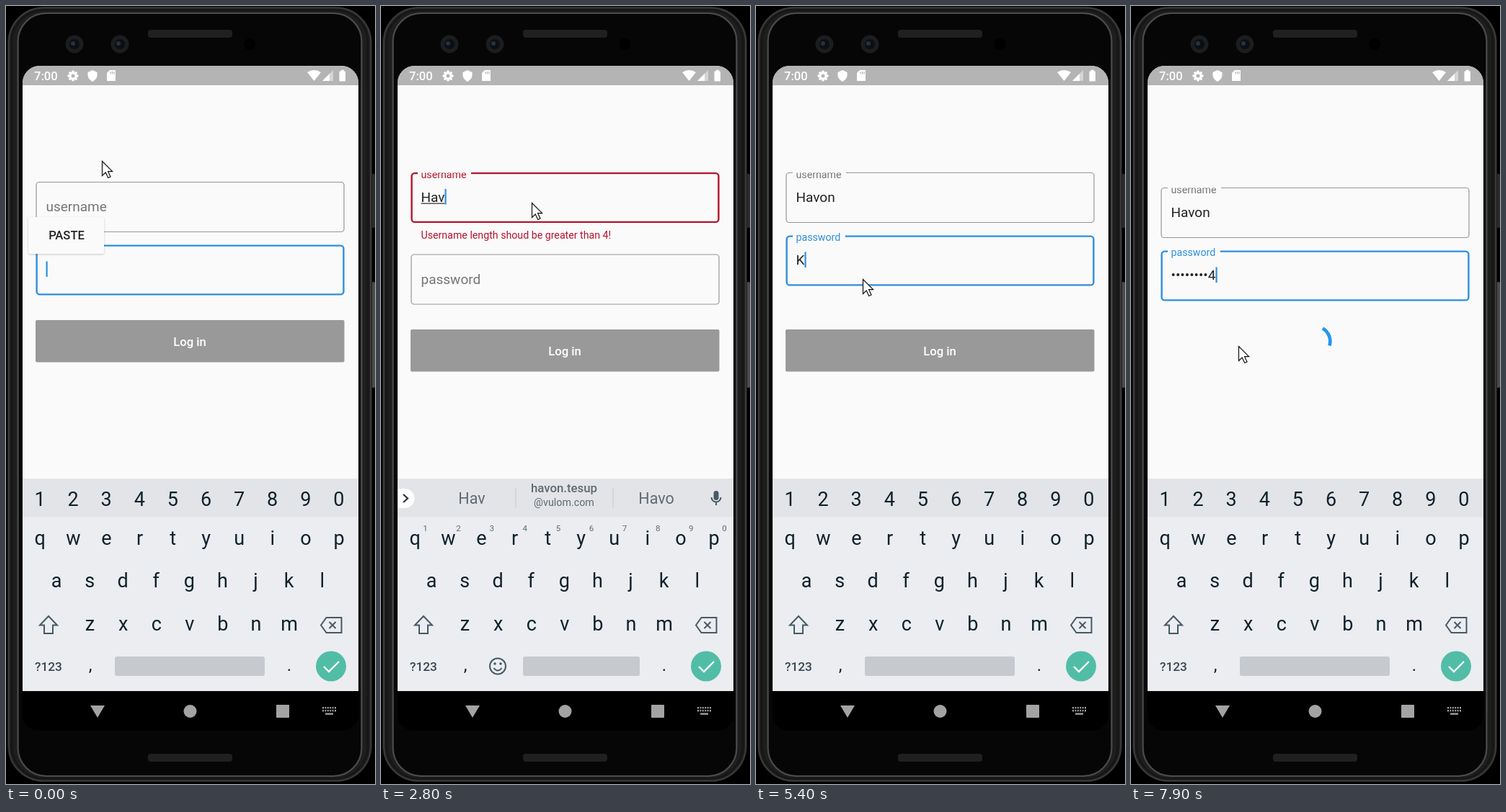
Recreate the animation shown at these times as an HTML page with a canvas. Size 512 by 1080 pixels, loop 8000 ms.

```html
<!DOCTYPE html>
<html lang="en">
<head>
<meta charset="utf-8">
<title>Login form</title>
<style>
html, body { margin: 0; width: 100%; height: 100%; overflow: hidden; background: #000; }
canvas { display: block; }
</style>
</head>
<body>
<canvas id="stage" width="512" height="1080"></canvas>
<script>
const c = document.getElementById('stage').getContext('2d');
const LOOP = 8000;
const NAME = 'Havon', SECRET = 'Kenop1234';
const BLUE = [45, 143, 222], RED = [178, 20, 46], GREY = [150, 150, 150], LABEL = [117, 117, 117];
const INK = '#10212a', SOFT = '#5f6a70';

// Moments of the story, in ms
const FOCUS_NAME = 1900, FOCUS_PASS = 4600, SUBMIT = 7700;
const nameKeys = [2300, 2500, 2700, 3000, 3230];
const passKeys = [5390, 5550, 5730, 5910, 6100, 6270, 6450, 6650, 6850];
const pointerStops = [[0, 133, 215], [900, 133, 215], [1500, 209, 273], [3700, 209, 273],
  [4300, 148, 379], [7250, 148, 379], [7600, 149, 472], [LOOP, 149, 472]];

const clamp = v => Math.max(0, Math.min(1, v));
const ease = v => { v = clamp(v); return v * v * (3 - 2 * v); };
const ramp = (t, start) => ease((t - start) / 200);
const lerp = (a, b, p) => a + (b - a) * p;
const mix = (a, b, p) => a.map((v, i) => lerp(v, b[i], p));
const rgb = a => `rgb(${a.map(Math.round)})`;
const typed = (keys, t) => keys.filter(k => k <= t).length;

function text(s, x, y, size, color, align = 'left', weight = 400) {
  c.font = `${weight} ${size}px Roboto, sans-serif`;
  c.textAlign = align;
  c.fillStyle = color;
  c.fillText(s, x, y);
}
function box(x, y, w, h, color, r = 0) {
  c.fillStyle = color;
  c.beginPath();
  c.roundRect(x, y, w, h, r);
  c.fill();
}
function frame(x, y, w, h, r, color, width) {
  c.strokeStyle = color;
  c.lineWidth = width;
  c.beginPath();
  c.roundRect(x, y, w, h, r);
  c.stroke();
}
function disc(x, y, r, color) {
  c.fillStyle = color;
  c.beginPath();
  c.arc(x, y, r, 0, 7);
  c.fill();
}
function line(d, color, width = 2) {
  c.strokeStyle = color;
  c.lineWidth = width;
  c.stroke(new Path2D(d));
}
function shape(d, color) {
  c.fillStyle = color;
  c.fill(new Path2D(d));
}

function drawPhone() {
  box(0, 0, 512, 1080, '#000');
  box(507, 233, 5, 75, '#2b2b2b', 2);
  box(507, 383, 5, 147, '#4a4a4a', 2);
  box(2, 1, 506, 1076, '#1e1e1e', 50);
  frame(4, 2.5, 502, 1073, 48, '#3a3a3a', 2);
  frame(8, 5.5, 494, 1067, 45, '#161616', 2.5);
  box(18, 11, 474, 1057, '#060606', 38);
  frame(16.5, 10, 477, 1059, 39, '#4c4c4c', 2);
  for (const y of [33, 1038]) box(197, y, 117, 11, '#202020', 4);
  for (const x of [95, 158]) {
    disc(x, 53, 12.5, '#1b1d1f');
    disc(x, 53, 7, '#0b0f14');
    disc(x - 2, 52, 3, '#28313c');
  }
  disc(338, 53, 8, '#000');
  box(23, 940, 466, 66, '#000', [0, 0, 22, 22]);
}

function drawStatusBar() {
  box(23, 83, 466, 27, '#b4b4b4');
  text('7:00', 39, 103, 16.6, '#fff', 'left', 500);
  for (let i = 0; i < 8; i++) {
    c.save();
    c.translate(93, 97);
    c.rotate(i * Math.PI / 4);
    box(-1.7, -7.5, 3.4, 5, '#fff', 1);
    c.restore();
  }
  disc(93, 97, 5.5, '#fff');
  disc(93, 97, 2.5, '#b4b4b4');
  shape('M120 89l6.5 3v4c0 4-3 7-6.5 9c-3.5-2-6.5-5-6.5-9v-4z', '#fff');
  shape('M144 89h8v15h-12v-11z', '#fff');
  for (const x of [144.5, 147, 149.5]) box(x, 91, 1.2, 3.5, '#b4b4b4');
  shape('M418 92q9.5-6 19 0l-9.5 12z', '#fff');
  shape('M454 89v15h-15z', '#d5d5d5');
  shape('M449 94v10h-10z', '#fff');
  box(462.5, 90.5, 8.5, 14, '#fff', 1);
  box(464.8, 88.8, 4, 3, '#fff');
}

function drawField(f) {
  const { top, label, value, float, focus, error } = f;
  const active = mix(BLUE, RED, error);
  const width = focus > 0.5 ? 2.4 : 1.2;
  const inset = width / 2;
  frame(41.4 + inset, top - 0.6 + inset, 428.2 - width, 70.2 - width, 4,
    rgb(mix(GREY, active, focus)), width);
  if (float > 0) {
    c.font = '14.2px Roboto, sans-serif';
    box(51, top - 2, (c.measureText(label).width + 11) * float, 5, '#fafafa');
  }
  c.save();
  if (f.clipped) {
    c.beginPath();
    c.rect(41, top, 430, 70);
    c.clip();
  }
  text(label, 55.5, top + lerp(40.5, 7, float), lerp(19, 14.2, float),
    value ? rgb(mix(LABEL, active, focus)) : rgb(mix(LABEL, active, focus * float)));
  c.restore();
  text(value, 55.5, top + 40, 19, '#222');
  const end = 55.5 + c.measureText(value).width;
  if (f.composing && value) box(55.5, top + 42, end - 55.5, 1.2, '#333');
  if (f.caret) box(end, top + 22.5, 2.2, 21.5, rgb(BLUE));
  if (f.bad) {
    c.globalAlpha = error;
    text(f.message, 55.5, top + 91, 14.2, rgb(RED));
    c.globalAlpha = 1;
  }
}

function drawForm(t) {
  const onName = t >= FOCUS_NAME && t < FOCUS_PASS;
  const nameCount = typed(nameKeys, t), passCount = typed(passKeys, t);
  const nameBad = nameCount > 0 && nameCount < 5;
  const passBad = passCount > 0 && passCount < 9;
  const loading = t >= SUBMIT;
  const shift = (nameBad || passBad ? -13 : 0) + (loading ? 8 : 0);
  const nameFocus = ramp(t, FOCUS_NAME) - ramp(t, FOCUS_PASS);
  const lastEvent = Math.max(...[0, FOCUS_NAME, FOCUS_PASS, ...nameKeys, ...passKeys].filter(e => e <= t));
  const caret = (t - lastEvent) % 1000 < 500;

  drawField({
    top: 244.5 + shift, label: 'username', value: NAME.slice(0, nameCount),
    float: nameCount ? 1 : nameFocus, focus: nameFocus,
    bad: nameBad, error: ramp(t, nameKeys[0]) - ramp(t, nameKeys[4]),
    message: 'Username length shoud be greater than 4!',
    caret: caret && onName, composing: onName, clipped: true
  });
  drawField({
    top: 332 + (nameBad ? 13 : shift), label: 'password',
    value: passCount ? '•'.repeat(passCount - 1) + SECRET[passCount - 1] : '',
    float: 1 - nameFocus, focus: 1 - nameFocus,
    bad: passBad, error: ramp(t, passKeys[0]) - ramp(t, passKeys[8]),
    message: 'Password length shoud be greater than 8!',
    caret: caret && !onName
  });

  if (loading) {
    const s = (t - SUBMIT) / 1000;
    const start = (-90 + 150 * s) * Math.PI / 180;
    c.strokeStyle = '#2196f3';
    c.lineWidth = 4.7;
    c.beginPath();
    c.arc(255.5, 465.5, 20.8, start, start + 1.5 * Math.PI * ease(s * 1.75) + 0.001);
    c.stroke();
  } else {
    const y = 436 + (nameBad || passBad ? 13 : 0);
    box(41, y, 428.5, 58.5, passCount === 9 ? '#2196f3' : '#999', 2);
    text('Log in', 255, y + 35.5, 16.6, '#fff', 'center', 500);
  }
  if (t < 900) {
    c.shadowColor = '#0003';
    c.shadowBlur = 3;
    c.shadowOffsetY = 1;
    box(31, 293, 105, 51, '#fafafa', 2);
    c.shadowColor = 'transparent';
    text('PASTE', 84, 324, 16.6, '#222', 'center', 500);
  }
}

function drawSuggestions(count) {
  box(23, 670, 23.5, 27, '#fff', [0, 13.5, 13.5, 0]);
  line('M31 678l6 5.5l-6 5.5', '#263238', 2.2);
  box(461.5, 673, 7, 13, '#455a64', 3.5);
  line('M458.5 682a6.5 6.5 0 0 0 13 0M465 688.5v4.5', '#455a64');
  if (!count) return;
  box(186.5, 669, 1, 28, '#c3c7cb');
  box(321.5, 669, 1, 28, '#c3c7cb');
  text(NAME.slice(0, count), 126, 691, 21.5, SOFT, 'center');
  text('havon.tesup', 254, 675, 16.8, SOFT, 'center', 500);
  text('@vulom.com', 254, 694, 14.3, SOFT, 'center');
  text(NAME.slice(0, 4), 382, 691, 21.5, SOFT, 'center');
}

function drawKeyboard(t) {
  const words = t >= FOCUS_NAME && t < FOCUS_PASS;
  const digits = '1234567890';
  const row = (keys, x, y, size = 27, color = INK) =>
    [...keys].forEach((k, i) => text(k, x + i * 46.1, y, size, color, 'center'));
  box(23, 656, 466, 295, '#ebedf1');
  box(23, 656, 466, 53, '#e2e4e8');
  if (words) {
    drawSuggestions(typed(nameKeys, t));
    row(digits, 61.5, 729, 11.5, SOFT);
  } else row(digits, 47, 693.5);
  row('qwertyuiop', 47.2, 748);
  row('asdfghjkl', 70, 807);
  row('zxcvbnm', 116.5, 866.5);
  line('M59 847l12 12.5h-6v11.5h-12v-11.5h-6z', '#455a64');
  line('M437 859.5l7.5-10.5h21v21h-21zM448.5 855l9 9m0-9l-9 9', '#455a64');
  text('?123', 59, 923, 17.3, '#37474f', 'center', 500);
  text(',', 117, 923, 24, INK, 'center');
  text('.', 393, 923, 24, INK, 'center');
  const left = words ? 197 : 151;
  box(left, 903, 359 - left, 27, '#c6c9ce', 3);
  if (words) {
    line('M173 916.5a11 11 0 1 0-22 0a11 11 0 1 0 22 0M156.5 919q5.5 7 11 0', '#455a64');
    disc(158, 913, 1.8, '#455a64');
    disc(166, 913, 1.8, '#455a64');
  }
  disc(451, 916.5, 21, '#52bda6');
  line('M441 917l7 7l14-14', '#fff', 2.3);
}

function drawNavigation() {
  box(23, 951, 466, 30, '#000');
  shape('M117 971h20l-10 17z', '#a3a3a3');
  disc(255.5, 979, 9, '#a3a3a3');
  box(375, 970, 18, 18, '#a3a3a3', 1);
  for (let i = 0; i < 12; i++) box(439 + i % 6 * 3.4, 973 + Math.floor(i / 6) * 4, 2, 2.4, '#a3a3a3');
  box(443, 981.5, 11, 2.3, '#a3a3a3');
}

function drawPointer(t) {
  const i = pointerStops.findIndex(p => p[0] > t);
  const [t0, x0, y0] = pointerStops[i - 1], [t1, x1, y1] = pointerStops[i];
  const p = ease((t - t0) / (t1 - t0));
  c.save();
  c.translate(lerp(x0, x1, p) + 0.5, lerp(y0, y1, p) + 0.5);
  const arrow = 'M0 0v20l4.7-4.5l3.5 7.5l3.3-1.5l-3.4-7.3h6z';
  shape(arrow, '#fff');
  line(arrow, '#111', 1.2);
  c.restore();
}

function draw(now) {
  const t = now % LOOP;
  drawPhone();
  c.save();
  c.beginPath();
  c.roundRect(23, 83, 466, 868, [24, 24, 0, 0]);
  c.clip();
  box(23, 83, 466, 868, '#fafafa');
  drawStatusBar();
  drawForm(t);
  drawKeyboard(t);
  c.restore();
  drawNavigation();
  drawPointer(t);
}

const begin = performance.now();
function tick() {
  draw(performance.now() - begin);
  requestAnimationFrame(tick);
}
tick();
</script>
</body>
</html>
```
